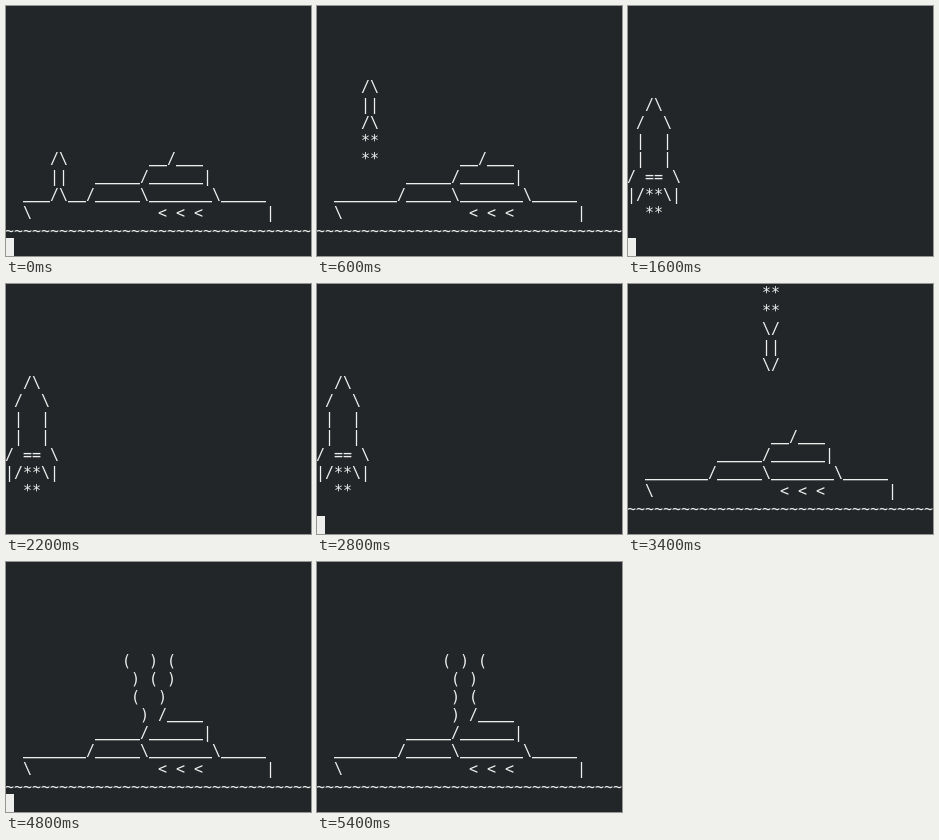
These frames come from a looping animation (305x250 px, 5.6 s). An HTML page with a canvas:

```html
<!DOCTYPE html>
<html lang="en">
<head>
<meta charset="utf-8">
<title>ASCII rocket</title>
<style>
html, body { margin: 0; width: 100%; height: 100%; overflow: hidden; background: #232629; }
canvas { display: block; }
</style>
</head>
<body>
<canvas id="stage" width="305" height="250"></canvas>
<script>
const ctx = document.getElementById('stage').getContext('2d');
const LOOP = 5600, TICK = 100, BLINK = 583;
const CELL = 9, LINE = 18, LEFT = -1, BASE = 14;
const PAPER = '#232629', INK = '#eeeeec';

const padTop = ['__/___'];
const pad = [
  '          _____/______|',
  '  _______/_____\\_______\\_____',
  '  \\              < < <       |',
  '~'.repeat(35)
];
const shipUp = ['/\\', '||', '/\\'];
const shipDown = ['**', '**', '\\/', '||', '\\/'];
const bigShip = [
  '  /\\',
  ' /  \\',
  ' |  |',
  ' |  |',
  '/ == \\',
  '|/**\\|',
  '  **'
];
const blast = [
  '   ( ( ) )',
  '  (  ) (  )',
  '(  ( ) ( )  )',
  '  (  ( )  )'
];
const smokeLeft = ['(  ) (', ' ) ( )', ' (  )'];
const smokeMid = [' ( ) (', '  ( )', '  ) ('];
const smokeRight = [' ) (  )', '  ( ) (', '  (  )'];
const smoke = [smokeRight, smokeLeft, smokeMid, smokeRight, smokeMid];

let grid;

// Spaces leave what is already in the cell.
function put(row, col, lines) {
  lines.forEach((line, i) => [...line].forEach((ch, j) => {
    if (ch !== ' ') grid[row + i][col + j] = ch;
  }));
}

function launch(t) {
  const top = t < 100 ? 8 : t < 400 ? 6 : 7 - Math.floor(t / 200);
  put(8, 16, padTop);
  put(9, 0, pad);
  put(top, 5, shipUp);
  for (let row = top + 3; row < Math.min(top + 5, 10); row++) put(row, 5, ['**']);
}

function cruise(t) {
  put(5, 0, bigShip);
  if (t / TICK % 2) put(12, 2, ['**']);
}

function fall(t) {
  const step = Math.floor((t - 3400) / 200);
  put(9, 0, pad);
  if (step < 5) {
    put(8, 16, step < 4 ? padTop : [' __/__']);
    put(step, 15, shipDown);
    return;
  }
  put(8, 15, [') /____']);
  if (step === 5) put(4, 9, blast);
  else put(5, 13, smoke[step - 6]);
}

// Underscores are ruled so that they join into one crisp line.
function drawCell(ch, x, y) {
  if (ch === '_') ctx.fillRect(x, y + 1, CELL, 1.3);
  else ctx.fillText(ch, x, y);
}

function draw(now) {
  const t = Math.floor(now % LOOP / TICK) * TICK;
  grid = Array.from({ length: 14 }, () => []);
  (t < 1600 ? launch : t < 3400 ? cruise : fall)(t);

  ctx.fillStyle = PAPER;
  ctx.fillRect(0, 0, 305, 250);
  ctx.fillStyle = INK;
  ctx.font = '15px "DejaVu Sans Mono", monospace';
  grid.forEach((line, row) => line.forEach((ch, col) =>
    drawCell(ch, LEFT + col * CELL, BASE + row * LINE)));
  if (Math.floor(t / BLINK) % 2 === 0) ctx.fillRect(0, 232, 8, 18);
}

let start;
function frame(now) {
  start ??= now;
  draw(now - start);
  requestAnimationFrame(frame);
}
draw(0);
requestAnimationFrame(frame);
</script>
</body>
</html>
```
